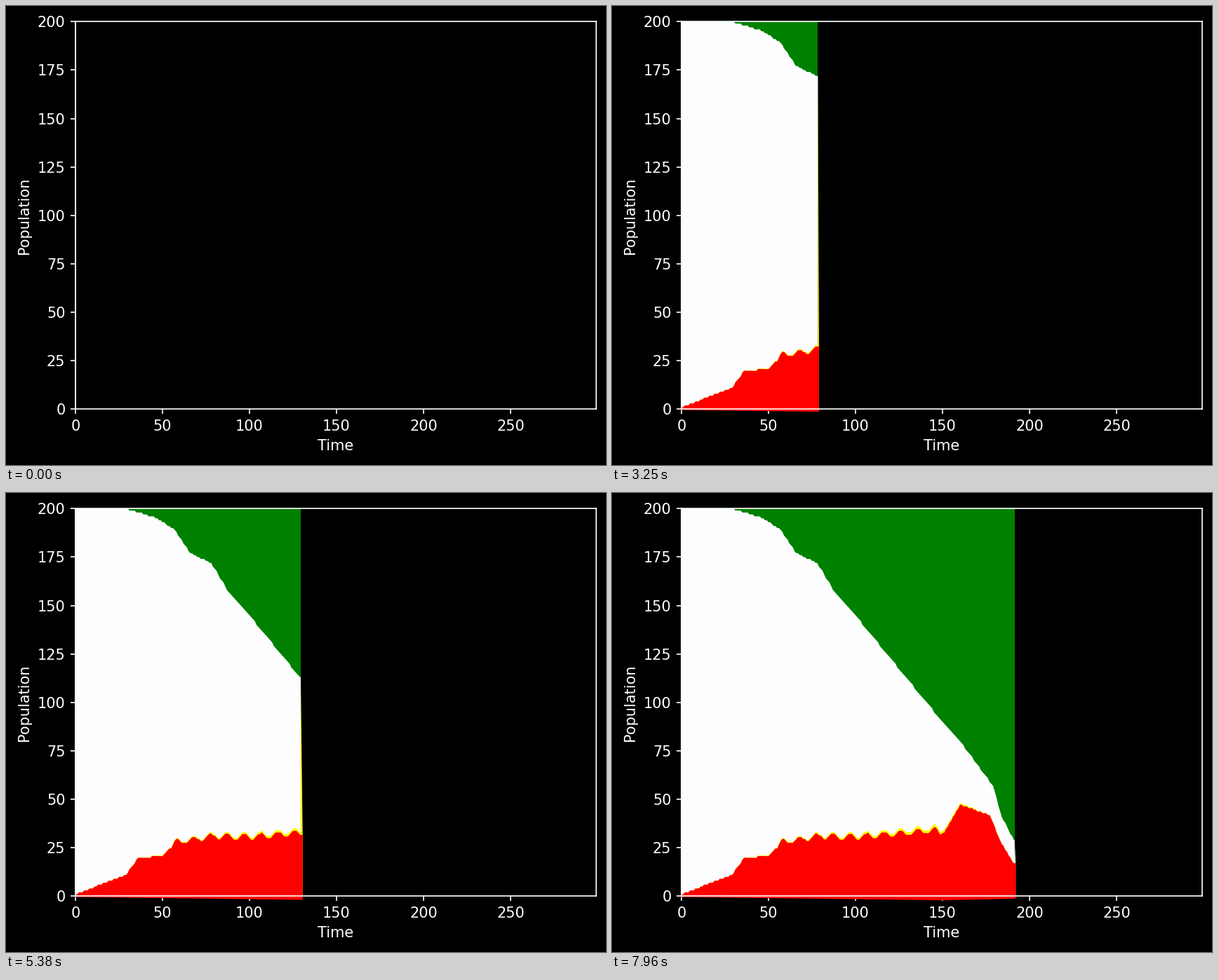
These frames come from a looping animation (855x655 px, 8 s). A matplotlib script:

```python
import numpy as np
import matplotlib.pyplot as plt
from matplotlib.animation import FuncAnimation
from matplotlib.patches import Polygon

W, H = 855, 655
DAYS, FRAMES, INTERVAL = 192, 200, 40
S = 1.5  # scale of all point sizes

plt.style.use("dark_background")
plt.rcParams.update({
    "font.family": "DejaVu Sans",
    "font.size": 10 * S,
    "axes.linewidth": 0.8 * S,
    "axes.labelpad": 4 * S,
    "figure.facecolor": "black",
    "axes.facecolor": "black",
    "toolbar": "None",
})
for axis in ("xtick", "ytick"):
    plt.rcParams[axis + ".major.size"] = 3.5 * S
    plt.rcParams[axis + ".major.width"] = 0.8 * S
    plt.rcParams[axis + ".major.pad"] = 3.5 * S

LEFT, RIGHT, TOP, BOTTOM = 99, 840.6, 22.3, 575.4
fig = plt.figure(figsize=(W / 100, H / 100), dpi=100)
ax = fig.add_axes([LEFT / W, 1 - BOTTOM / H,
                   (RIGHT - LEFT) / W, (BOTTOM - TOP) / H])
ax.set_xlim(0, 299)
ax.set_ylim(0, 200)
ax.set_xticks(range(0, 251, 50))
ax.set_yticks(range(0, 201, 25))
ax.set_xlabel("Time")
ax.set_ylabel("Population")

# Data units per pixel
PX = 299 / (RIGHT - LEFT)
PY = 200 / (BOTTOM - TOP)

t = np.arange(DAYS)

# Upper border of the healthy: a fall that steepens towards the end
healthy = np.round(np.interp(
    t, [29, 47, 57, 66, 78, 88, 99, 128, 150, 160, 179, 184, 191],
    [200, 195, 189, 177, 172, 157, 146, 114, 90, 80, 57, 41, 29]))

# Upper border of the sick: growth, a rippling plateau, a late wave
trend = np.interp(
    t, [0, 20, 29, 36, 50, 58, 80, 100, 145, 151, 160, 177, 184, 191],
    [1, 8, 11, 20, 21, 28.5, 31.8, 31.5, 35.5, 34, 48, 42, 27, 17])
ripple = 1.5 * np.cos(2 * np.pi * (t - 58) / 9.7)
sick = np.round(trend + np.where((t > 54) & (t < 150), ripple, 0))

rim = np.interp(t, [25, 145, 178], [0, 1.5, 0])
bulge = np.interp(t, [0, 150, 191], [1.1, 5.8, 3.5])
sag = -PY * bulge
spread = PX * np.maximum(1.2, 0.72 * bulge)
zero = np.zeros(DAYS)
full = np.full(DAYS, 200.0)


def patch(color, z):
    p = Polygon([(0, 0)] * 3, closed=True, facecolor=color, linewidth=0,
                clip_on=False, zorder=z)
    return ax.add_patch(p)


# Between the ticks (1.5) and the frame lines (2.5)
WHITE, YELLOW = "#fdfdff", "#ffff00"
green = patch("#008000", 1.80)
white = patch(WHITE, 1.81)
sliver = patch(YELLOW, 1.82)
yellow = patch(YELLOW, 1.83)
red = patch("#ff0000", 1.84)


def band(p, k, low, high, right):
    x = np.concatenate([[-PX], t[:k + 1], [k + right]])
    lo, hi = (np.pad(v[:k + 1], 1, mode="edge") for v in (low, high))
    p.set_xy(np.column_stack([np.r_[x, x[::-1]], np.r_[lo, hi[::-1]]]))


def draw(n):
    k = int((n + 0.6) * DAYS / FRAMES)
    edge = k + PX
    band(green, k, zero, full, PX)
    band(white, k, zero, healthy, PX)
    band(yellow, k, zero, sick, spread[k])
    band(red, k, sag, sick - rim, spread[k])
    sliver.set_xy([(edge, healthy[k]), (k + spread[k], sick[k]),
                   (edge, sick[k])])
    sliver.set_facecolor(YELLOW if rim[k] > 0 or k < 100 else WHITE)
    for p in (sliver, yellow, red):
        p.set_visible(k > 0)
    return green, white, sliver, yellow, red


anim = FuncAnimation(fig, draw, frames=FRAMES, interval=INTERVAL,
                     init_func=lambda: draw(0), repeat=True, repeat_delay=0,
                     blit=False)
plt.show()
```
